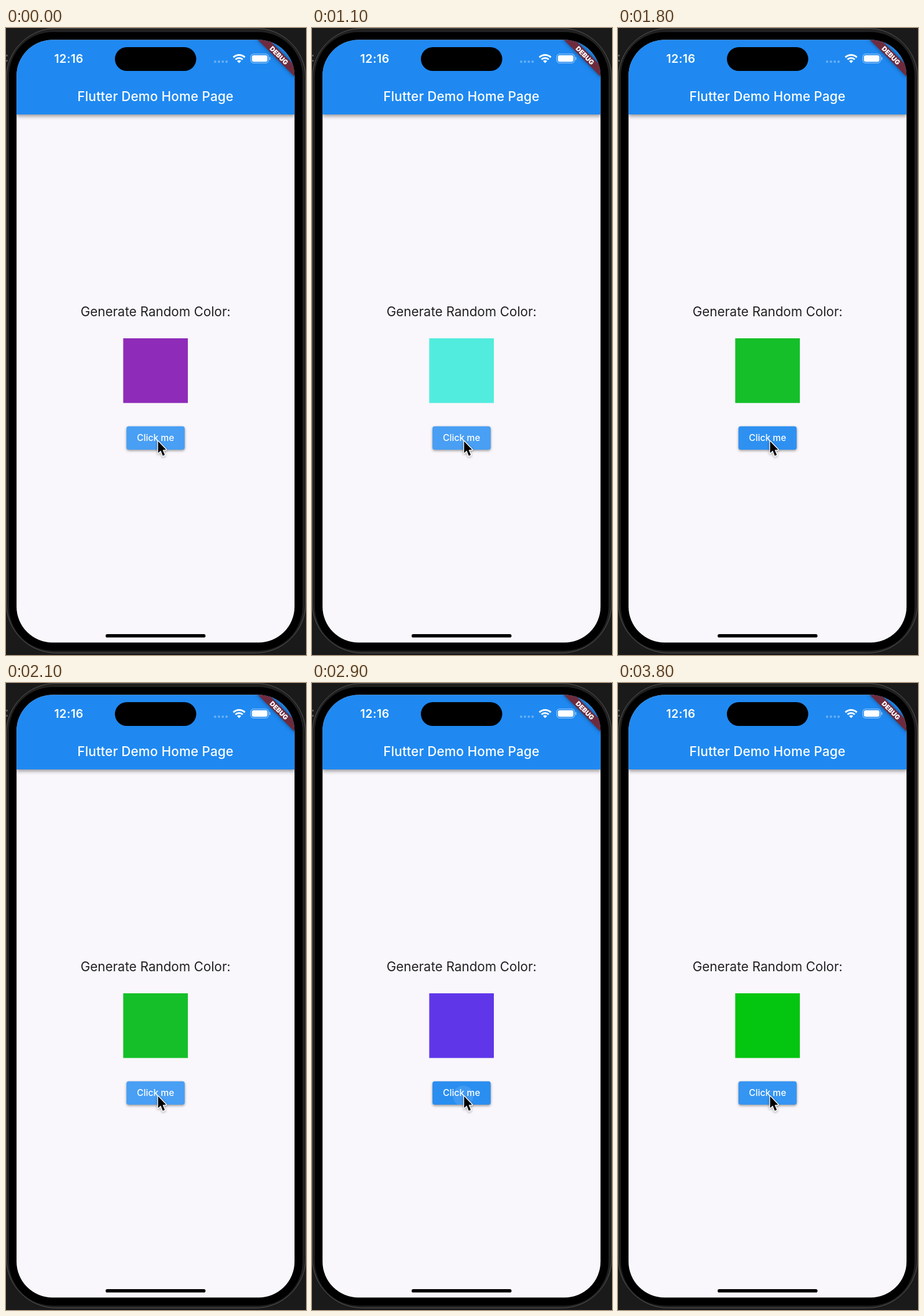
An HTML page with a canvas that plays this animation: 518 by 1081 pixels, repeating every 3.9 s.

```html
<!DOCTYPE html>
<html lang="en">
<head>
<meta charset="utf-8">
<title>Random color demo</title>
<style>
html, body { margin: 0; width: 100%; height: 100%; overflow: hidden; background: #1a1a1a; }
canvas { display: block; width: 518px; height: 1081px; }
</style>
</head>
<body>
<canvas id="stage" width="518" height="1081"></canvas>
<script>
const ctx = document.getElementById('stage').getContext('2d');
const LOOP = 3900, STEP = 100;
const BLUE = '#1f89f1';
const FONT = 'Inter, Roboto, sans-serif';
const SCREEN = [18.2, 20.6, 480, 1038.9, 62];
const BUTTON = [208, 686.8, 100.5, 40.2, 4];

// Press time, release time, color of the square after the release
const clicks = [
  [-240, -100, '#8e2bb9'],
  [240, 400, '#5698fa'],
  [780, 950, '#52ecde'],
  [1300, 1520, '#15bf29'],
  [1840, 1980, '#15bf29'],
  [2450, 2600, '#5f37e9'],
  [2830, 3050, '#bdc813'],
  [3360, 3555, '#04c510']
];

const clamp = v => Math.max(0, Math.min(1, v));
const white = a => `rgba(255,255,255,${a})`;
const black = a => `rgba(0,0,0,${a})`;

function roundPath(x, y, w, h, r) {
  ctx.beginPath();
  ctx.roundRect(x, y, w, h, r);
}

function box(x, y, w, h, r, fill) {
  roundPath(x, y, w, h, r);
  ctx.fillStyle = fill;
  ctx.fill();
}

function shadow(color, blur, dy) {
  ctx.shadowColor = color;
  ctx.shadowBlur = blur;
  ctx.shadowOffsetY = dy;
}

function noShadow() {
  shadow('transparent', 0, 0);
}

function label(text, x, y, size, weight, fill, spacing = 0) {
  ctx.font = `${weight} ${size}px ${FONT}`;
  ctx.letterSpacing = spacing + 'px';
  ctx.textAlign = 'center';
  ctx.fillStyle = fill;
  ctx.fillText(text, x, y);
}

function drawPhone() {
  ctx.fillStyle = '#1a1a1a';
  ctx.fillRect(0, 0, 518, 1081);
  box(0.5, 0.5, 517, 1077, 86, '#202020');
  ctx.strokeStyle = '#555';
  ctx.lineWidth = 1;
  ctx.stroke();
  box(5, 7, 507, 1066.5, 76, '#000');
  ctx.fillStyle = '#555';
  ctx.fillRect(0, 46, 3, 3);
  ctx.fillRect(0, 55, 3, 3);
}

function drawWifi() {
  ctx.save();
  ctx.beginPath();
  ctx.moveTo(402.5, 60.5);
  ctx.lineTo(386.5, 44.5);
  ctx.lineTo(418.5, 44.5);
  ctx.closePath();
  ctx.clip();
  ctx.strokeStyle = '#fff';
  ctx.lineWidth = 3;
  for (const r of [14, 8.8]) {
    ctx.beginPath();
    ctx.arc(402.5, 60.5, r, 0, Math.PI * 2);
    ctx.stroke();
  }
  ctx.beginPath();
  ctx.arc(402.5, 60.5, 5, 0, Math.PI * 2);
  ctx.fillStyle = '#fff';
  ctx.fill();
  ctx.restore();
}

function drawStatus() {
  label('12:16', 108.5, 60, 20, 600, '#fff', 0.4);
  box(188, 33, 140.5, 41, 20.5, '#000');
  for (let i = 0; i < 4; i++) box(359 + i * 6.6, 56, 4.2, 4.2, 2.1, white(0.32));
  drawWifi();
  roundPath(422.5, 44.9, 31, 15.4, 5);
  ctx.strokeStyle = white(0.5);
  ctx.lineWidth = 1.2;
  ctx.stroke();
  box(424.6, 47, 26.8, 11.2, 3.3, '#fff');
  box(454.6, 50, 1.8, 5.2, 1, white(0.5));
}

function drawBanner() {
  ctx.save();
  ctx.translate(498.2, 20.6);
  ctx.rotate(Math.PI / 4);
  shadow(black(0.5), 7, 0);
  box(-46, 31.2, 92, 13.4, 0, '#6e2b3e');
  noShadow();
  label('DEBUG', 0, 42.1, 11.4, 900, '#fff');
  ctx.restore();
}

function ripple(age, held) {
  const start = 9 + 0.125 * Math.min(age, held);
  const freed = Math.max(0, age - held);
  const radius = start + (72 - start) * clamp(freed / 100);
  const strength = 0.16 * clamp(Math.min(age, held) / 110);
  const alpha = freed > 0
    ? (strength + (0.19 - strength) * clamp(freed / 60)) * clamp((350 - freed) / 200)
    : strength;
  if (alpha <= 0) return;
  ctx.beginPath();
  ctx.arc(261, 712, radius, 0, Math.PI * 2);
  ctx.fillStyle = white(alpha);
  ctx.fill();
}

function drawButton(t) {
  const active = clicks.filter(c => t >= c[0] && t - c[1] < 350);
  let lift = 0;
  for (const [down, up] of active) {
    const peak = clamp((Math.min(t, up) - down - 60) / 130);
    lift = Math.max(lift, peak * clamp(1 - (t - up) / 100));
  }
  shadow(black(0.4 + 0.05 * lift), 4 + 7 * lift, 1.8 + 3.5 * lift);
  box(...BUTTON, BLUE);
  noShadow();
  ctx.save();
  roundPath(...BUTTON);
  ctx.clip();
  ctx.fillStyle = black(0.085 * lift);
  ctx.fillRect(200, 680, 120, 60);
  for (const [down, up] of active) ripple(t - down, up - down);
  ctx.restore();
  label('Click me', 258.2, 712, 15.6, 500, '#fff');
}

function drawCursor() {
  ctx.beginPath();
  ctx.moveTo(262.6, 712.4);
  ctx.lineTo(262.6, 732.8);
  ctx.lineTo(267.2, 728.6);
  ctx.lineTo(270.7, 737.6);
  ctx.lineTo(274.2, 736.1);
  ctx.lineTo(270.5, 727.4);
  ctx.lineTo(276.4, 727);
  ctx.closePath();
  shadow(black(0.35), 4, 1.5);
  ctx.strokeStyle = '#fff';
  ctx.lineWidth = 2.8;
  ctx.lineJoin = 'round';
  ctx.stroke();
  noShadow();
  ctx.fillStyle = '#000';
  ctx.fill();
}

function drawScreen(t) {
  ctx.save();
  roundPath(...SCREEN);
  ctx.clip();
  ctx.fillStyle = '#f9f7fb';
  ctx.fillRect(18, 20, 481, 1040);
  shadow(black(0.45), 7, 2.5);
  box(18, 20, 481, 129, 0, BLUE);
  noShadow();
  drawStatus();
  label('Flutter Demo Home Page', 258, 126, 22.3, 500, '#fff', 0.17);
  drawBanner();

  label('Generate Random Color:', 258.2, 497, 22.3, 400, '#212022');
  const last = clicks.filter(c => c[1] <= t).pop();
  box(202.4, 535, 111.6, 111.5, 0, last[2]);
  drawButton(t);
  box(172, 1045, 172.5, 5.8, 2.9, '#000');
  ctx.restore();
}

function frame(now) {
  const t = Math.floor((now % LOOP) / STEP) * STEP;
  drawPhone();
  drawScreen(t);
  drawCursor();
}

let begin = null;
function tick(now) {
  if (begin === null) begin = now;
  frame(Math.max(0, now - begin));
  requestAnimationFrame(tick);
}
frame(0);
requestAnimationFrame(tick);
</script>
</body>
</html>
```
